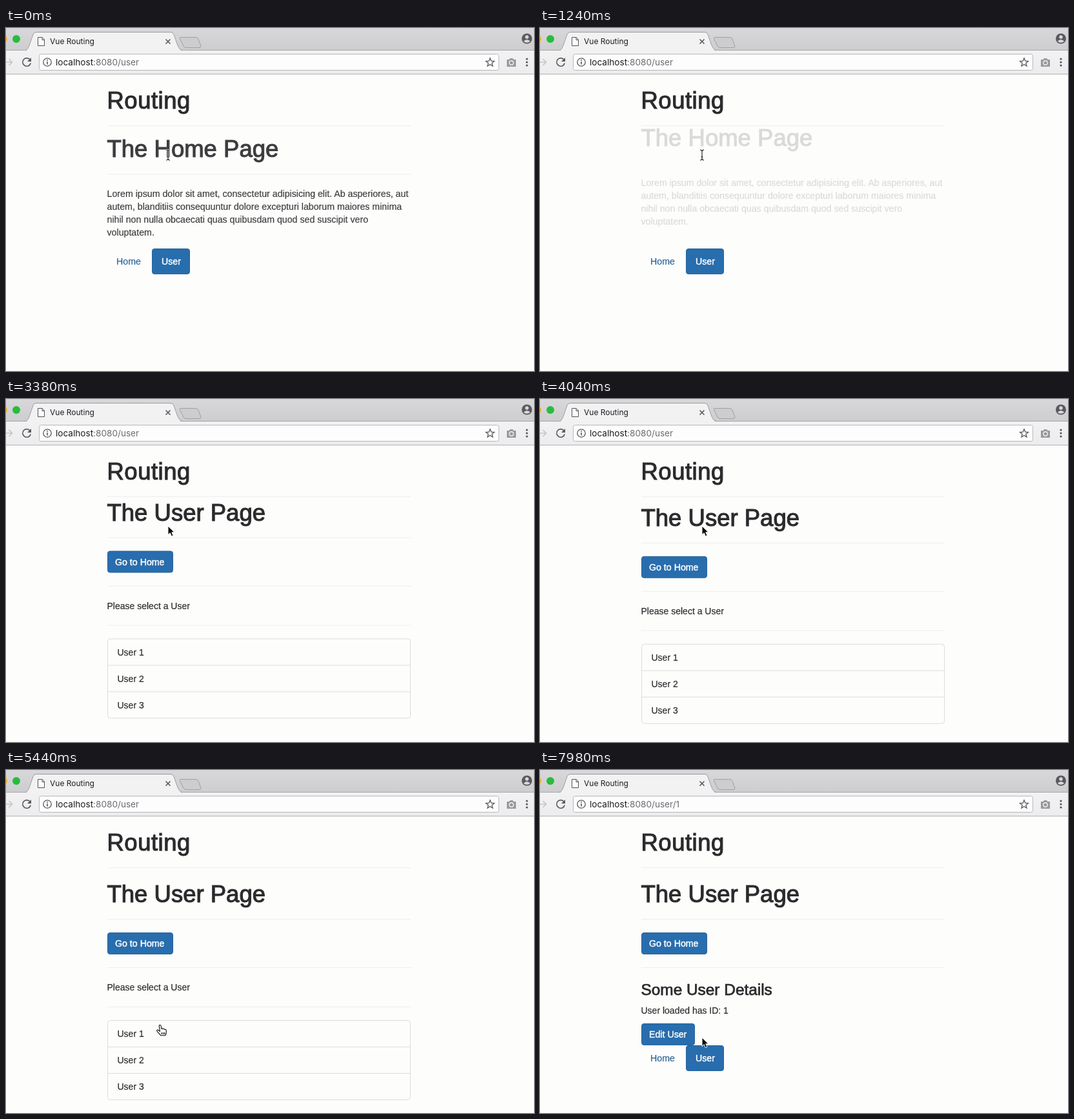
Write an HTML page that moves like this. It is 818 px wide and 532 px high and loops after 8 s.

```html
<!DOCTYPE html>
<html lang="en">
<head>
<meta charset="utf-8">
<title>Vue Routing</title>
<style>
  html, body { margin: 0; width: 100%; height: 100%; overflow: hidden; background: #fdfdfc; }
  svg { display: block; width: 818px; height: 532px; }
  text { font: 14px "Liberation Sans", Arial, sans-serif; fill: #2b2b2d; stroke: #2b2b2d; stroke-width: .2px; white-space: pre; }
  .ui { font: 12px Inter, Roboto, sans-serif; fill: #1c1c1e; stroke: none; }
  .url { font-size: 13.6px; }
  .h1 { font-size: 36.5px; stroke-width: 1.1px; }
  .brand { letter-spacing: .5px; }
  .h3 { font-size: 24.4px; stroke-width: .75px; }
  .para { font-size: 14.2px; }
  .on { fill: #fdfdfd; font-size: 14.2px; stroke: #fdfdfd; stroke-width: .45px; }
  .link { fill: #2d6595; font-size: 14.2px; stroke: #2d6595; }
  .button { fill: #286dad; stroke: #28639b; }
  .line { stroke: #eeeef0; fill: none; }
  .list { stroke: #dcdcde; fill: none; }
  .icon { fill: none; stroke: #58585c; stroke-width: 1.6; }
</style>
</head>
<body>
<svg viewBox="0 0 818 532">
  <defs>
    <linearGradient id="strip" x2="0" y2="1">
      <stop stop-color="#d8d8db"/><stop offset="1" stop-color="#cdcdd0"/>
    </linearGradient>
    <linearGradient id="bar" x2="0" y2="1">
      <stop stop-color="#f2f2f3"/><stop offset="1" stop-color="#ececee"/>
    </linearGradient>
  </defs>
  <rect width="818" height="532" fill="#fdfdfc"/>

  <g id="browser">
    <rect width="818" height="35" fill="url(#strip)"/>
    <rect y="34" width="818" height="38" fill="url(#bar)"/>
    <path d="M0 34.5H818" stroke="#a6a6a9"/>
    <path d="M30 35.5C35 34 36 27 42 10Q43 6.5 47 6.5H255Q259 6.5 260 10C266 27 267 34 273 35.5Z" fill="#f2f2f3"/>
    <path d="M30 34.5C35 33 36 27 42 10Q43 6.5 47 6.5H255Q259 6.5 260 10C266 27 267 33 273 34.5" fill="none" stroke="#9c9c9f"/>
    <path d="M270 14.5H294Q297 14.5 298 17L302 28Q302 30.5 299 30.5H280Q276 30.5 275 28L269 16Z" fill="#cdcdd0" stroke="#9f9fa2"/>
    <path d="M0 71.5H818" stroke="#b2b2b5"/>
    <circle cx="-4" cy="17" r="6" fill="#f2b32e"/>
    <circle cx="16" cy="17" r="6" fill="#27bd3c"/>
    <path d="M49.5 14.5H56L59.5 18V27.5H49.5ZM56 14.5V18.5H59.5" fill="#fdfdfd" stroke="#525256"/>
    <text class="ui" x="68" y="25">Vue Routing</text>
    <path d="M247.5 17.5L254.5 24.5M254.5 17.5L247.5 24.5" class="icon"/>
    <circle cx="807" cy="16.5" r="8" fill="#5a5a5e"/>
    <circle cx="807" cy="14" r="2.7" fill="#d8d8db"/>
    <path d="M801.8 20.5Q807 15.5 812.2 20.5Q807 25 801.8 20.5" fill="#d8d8db"/>
    <path d="M0 53H9M4.5 48L9.5 53L4.5 58" fill="none" stroke="#c6c6c9" stroke-width="1.7"/>
    <path d="M37 49A6.3 6.3 0 1 0 38.2 54.5" class="icon"/>
    <path d="M39 46V52H33Z" fill="#58585c"/>
    <rect x="51.5" y="40.5" width="712" height="25" rx="3" fill="#fdfdfd" stroke="#b8b8bb"/>
    <circle cx="64" cy="53" r="6.2" class="icon" style="stroke-width:1.3"/>
    <path d="M64 52V56.5M64 49V50.7" class="icon"/>
    <text class="ui url" x="77" y="58">localhost<tspan id="path" fill="#6c6c70">:8080/user</tspan></text>
    <path d="M750 46.8L751.8 51.2L756.4 51.5L752.8 54.5L754 59L750 56.5L746 59L747.2 54.5L743.6 51.5L748.2 51.2Z" class="icon" style="stroke-width:1.3"/>
    <path d="M776 49H779.5L781 47H785L786.5 49H790V60H776Z" fill="#98989c"/>
    <circle cx="783" cy="54" r="3.2" fill="#98989c" stroke="#efeff1" stroke-width="1.4"/>
    <g fill="#525256"><circle cx="807" cy="48" r="1.6"/><circle cx="807" cy="53" r="1.6"/><circle cx="807" cy="58" r="1.6"/></g>
  </g>

  <text class="h1 brand" x="156.5" y="125">Routing</text>
  <path class="line" d="M157 151.5H627"/>
  <g id="home"></g>
  <g id="user"></g>
  <g id="nav"></g>

  <g id="ibeam" fill="none">
    <path d="M-3 -8Q0 -8 0 -5.5Q0 -8 3 -8M0 -6V6M-3 8Q0 8 0 5.5Q0 8 3 8M-1.5 3H1.5" stroke="#fdfdfd" stroke-width="2.4"/>
    <path d="M-3 -8Q0 -8 0 -5.5Q0 -8 3 -8M0 -6V6M-3 8Q0 8 0 5.5Q0 8 3 8M-1.5 3H1.5" stroke="#18181a" stroke-width="1.1"/>
  </g>
  <path id="arrow" d="M0 0V13.6L3.2 10.7L5.4 15.8L8 14.7L5.8 9.8H10Z" fill="#0a0a0a" stroke="#fdfdfd"/>
  <path id="hand" d="M-.8 1Q-.6 -.7 .8 -.5Q2 -.3 2.1 1L2.8 5.2Q4.5 4.3 5.5 5.7Q7.2 5 8 6.4Q10 6 10.3 8L10.2 12L8.8 15.8H1.9L-1.5 12.2L-4.2 9Q-4.7 6.9 -2.6 7.2L.4 9.4ZM3.2 11V14M5.5 11V14M7.6 11V14" fill="#fdfdfd" stroke="#0a0a0a" stroke-width="1.1" stroke-linejoin="round"/>
</svg>
<script>
const LOOP = 8000, SLIDE = 2800, SWAP = 2530, SELECT = 7000, RISE = -30;
const el = id => document.getElementById(id);

const text = (x, y, words, cls = '') => `<text x="${x}" y="${y}" class="${cls}">${words}</text>`;
const rule = y => `<path class="line" d="M157 ${y}.5H627"/>`;
const button = (x, y, w, h, label, pad) =>
  `<rect class="button" x="${x + .5}" y="${y + .5}" width="${w - 1}" height="${h - 1}" rx="3.5"/>` +
  text(x + pad, y + h / 2 + 5, label, 'on');

const lorem = [
  'Lorem ipsum dolor sit amet, consectetur adipisicing elit. Ab asperiores, aut',
  'autem, blanditiis consequuntur dolore excepturi laborum maiores minima',
  'nihil non nulla obcaecati quas quibusdam quod sed suscipit vero',
  'voluptatem.'
];
el('home').innerHTML = text(156.5, 205, 'The Home Page', 'h1') + rule(231) +
  lorem.map((words, i) => text(156.5, 267 + 20 * i, words, 'para')).join('');

const rows = [1, 2, 3].map((n, i) => text(172.5, 414 + 41 * i, 'User ' + n)).join('');
el('user').innerHTML = text(156.5, 205, 'The User Page', 'h1') + rule(231) +
  button(157, 252, 102, 34, 'Go to Home', 12) + rule(306) +
  `<g id="list">${text(156.5, 342, 'Please select a User')}${rule(367)}
    <rect class="list" x="157.5" y="388.5" width="469" height="123" rx="4"/>
    <path class="list" d="M157 429.5H627M157 470.5H627"/>${rows}</g>` +
  `<g id="details">${text(156.5, 349, 'Some User Details', 'h3')}
    ${text(156.5, 378, 'User loaded has ID: 1')}${button(157, 393, 83, 34, 'Edit User', 12)}</g>`;

el('nav').innerHTML = text(171, 25, 'Home', 'link') + button(226, 0, 59, 40, 'User', 15);

function bezier(x1, y1, x2, y2) {
  const at = (a, b, s) => 3 * (1 - s) * (1 - s) * s * a + 3 * (1 - s) * s * s * b + s * s * s;
  return x => {
    if (x <= 0 || x >= 1) return x <= 0 ? 0 : 1;
    let lo = 0, hi = 1;
    for (let i = 0; i < 24; i++) {
      const mid = (lo + hi) / 2;
      if (at(x1, x2, mid) < x) lo = mid; else hi = mid;
    }
    return at(y1, y2, lo);
  };
}
const ease = bezier(.25, .1, .25, 1);
const easeOut = bezier(0, 0, .58, 1);

// time, x, y of the pointer
const pointer = [
  [0, 251, 197], [4200, 251, 197], [4600, 275, 270],
  [4800, 272, 300], [5300, 238, 396], [7100, 238, 396], [7540, 251, 415], [LOOP, 251, 415]
];
function pointerAt(t) {
  const i = pointer.findIndex(step => step[0] > t);
  const [t0, x0, y0] = pointer[i - 1], [t1, x1, y1] = pointer[i];
  const p = (t - t0) / (t1 - t0), k = p * p * (3 - 2 * p);
  return [x0 + (x1 - x0) * k, y0 + (y1 - y0) * k];
}

const show = (id, on) => el(id).style.display = on ? '' : 'none';
const place = (id, x, y) => el(id).setAttribute('transform', `translate(${x} ${y})`);

function draw(t) {
  const atHome = t < SWAP, selected = t >= SELECT;
  const leaving = (t - SWAP + SLIDE) / SLIDE;
  show('home', atHome);
  show('user', !atHome);
  show('list', !selected);
  show('details', selected);
  place('home', 0, RISE * easeOut(leaving));
  el('home').style.opacity = 1 - ease(leaving);
  place('user', 0, RISE * (1 - easeOut((t - SWAP) / SLIDE)));
  place('nav', 0, atHome ? 342 : selected ? 427 : 532);
  el('path').textContent = ':8080/user' + (selected ? '/1' : '');

  const [x, y] = pointerAt(t);
  const overLink = !atHome && (selected ? x < 240 && y > 393 : y > 388);
  const shape = atHome ? 'ibeam' : overLink ? 'hand' : 'arrow';
  for (const id of ['ibeam', 'arrow', 'hand']) show(id, id === shape);
  place(shape, x, y);
}

const start = performance.now();
function tick() {
  draw((performance.now() - start) % LOOP);
  requestAnimationFrame(tick);
}
tick();
</script>
</body>
</html>
```
